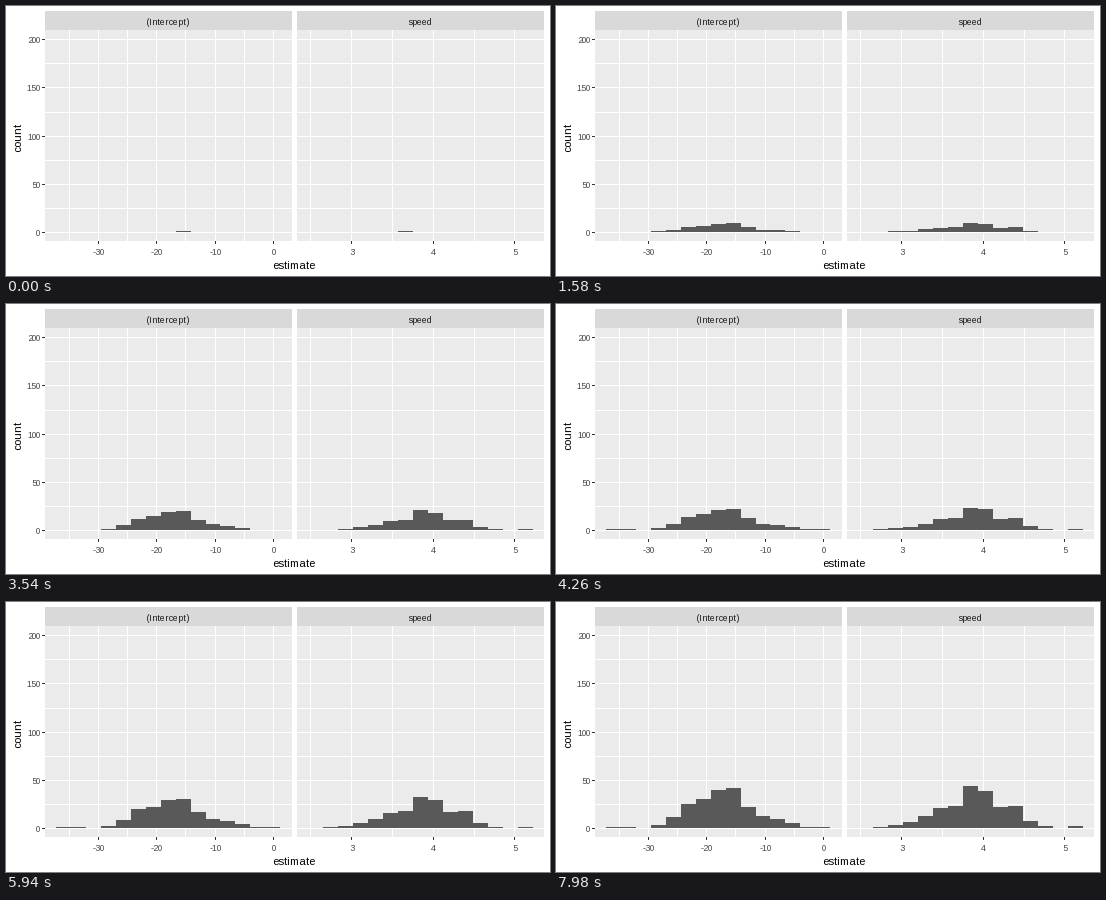
Recreate the animation shown at these times as a matplotlib script. Size 544 by 270 pixels, loop 8 s.

```python
import numpy as np
import matplotlib.pyplot as plt
from matplotlib.animation import FuncAnimation
from matplotlib.patches import Rectangle

W, H, DPI = 544, 270, 100
plt.rcParams.update({
    "font.family": "Liberation Sans",
    "text.hinting": "force_autohint",
    "text.hinting_factor": 1,
})

TOP, BOTTOM, BASE = 24, 235, 226
PANEL_W, PAD, BIN_W = 247, 11.4, 14.96

# Shape of each histogram once all samples are in.
INTERCEPT = [1, 1, 0, 3, 11, 25, 30, 39, 41, 22, 12, 9, 5, 1, 1]
SPEED = [0, 1, 3, 6, 12, 20, 23, 43, 38, 21, 23, 7, 2, 0, 2]


def running_counts(shape, first):
    """Counts after each sample; every bin fills at an even pace."""
    slots = [((j + 0.5) / c, b) for b, c in enumerate(shape) for j in range(c)]
    order = [b for _, b in sorted(slots)]
    order.remove(first)
    return np.cumsum(np.eye(len(shape))[[first] + order], axis=0)


def y_of(count):
    return 226.25 - 0.9655 * count


fig = plt.figure(figsize=(W / DPI, H / DPI), dpi=DPI, facecolor="white")
ax = fig.add_axes([0, 0, 1, 1])
ax.set_xlim(0, W)
ax.set_ylim(H, 0)
ax.axis("off")


def box(x, y, w, h, color, z=1):
    ax.add_patch(Rectangle((x, y), w, h, fc=color, lw=0,
                           antialiased=False, zorder=z))


def label(x, y, s, px, color, ha="center", va="baseline", **kw):
    ax.text(x, y, s, fontsize=px * 72 / DPI, color=color, ha=ha, va=va, **kw)


def panel(left, title, x_of, majors, minors, bins):
    x0 = int(left)
    box(x0, 5, PANEL_W, TOP - 5, "#D9D9D9")
    box(x0, TOP, PANEL_W, BOTTOM - TOP, "#EBEBEB")
    for c in range(0, 201, 25):
        box(x0, round(y_of(c)), PANEL_W, 1, "white", 2)
    for v in (*majors, *minors):
        box(round(x_of(v)), TOP, 1, BOTTOM - TOP, "white", 2)
    for v in majors:
        x = round(x_of(v))
        box(x, BOTTOM, 1, 3, "#333333", 2)
        label(x + 0.5, 249, str(v), 9, "#4D4D4D")
    label(x0 + PANEL_W / 2 - 0.5, 19, title, 9, "#1A1A1A")
    edges = np.floor(left + PAD + BIN_W * np.arange(bins + 1))
    return ax.stairs(np.full(bins, BASE), edges, baseline=BASE, fill=True,
                     color="#595959", lw=0, antialiased=False, zorder=3)


bars = [
    panel(39, "(Intercept)", lambda v: 267 + 5.84 * v,
          (-30, -20, -10, 0), (-35, -25, -15, -5), len(INTERCEPT)),
    panel(291.25, "speed", lambda v: 345.2 + 81.6 * (v - 3),
          (3, 4, 5), (2.5, 3.5, 4.5), len(SPEED)),
]
counts = [running_counts(INTERCEPT, 8), running_counts(SPEED, 6)]

for c in range(0, 201, 50):
    y = round(y_of(c))
    box(36, y, 3, 1, "#333333")
    label(34, y + 4, str(c), 9, "#4D4D4D", ha="right")
label(288, 263, "estimate", 11, "black")
label(17, 131, "count", 11, "black", ha="right", va="center", rotation=90)


def update(k):
    n = (k + 1) // 2
    for bar, c in zip(bars, counts):
        tops = np.where(c[n] > 0, np.floor(y_of(c[n])), BASE)
        bar.set_data(tops)
    return bars


anim = FuncAnimation(fig, update, frames=400, interval=20, repeat=True,
                     repeat_delay=0, init_func=lambda: update(0))
plt.show()
```
